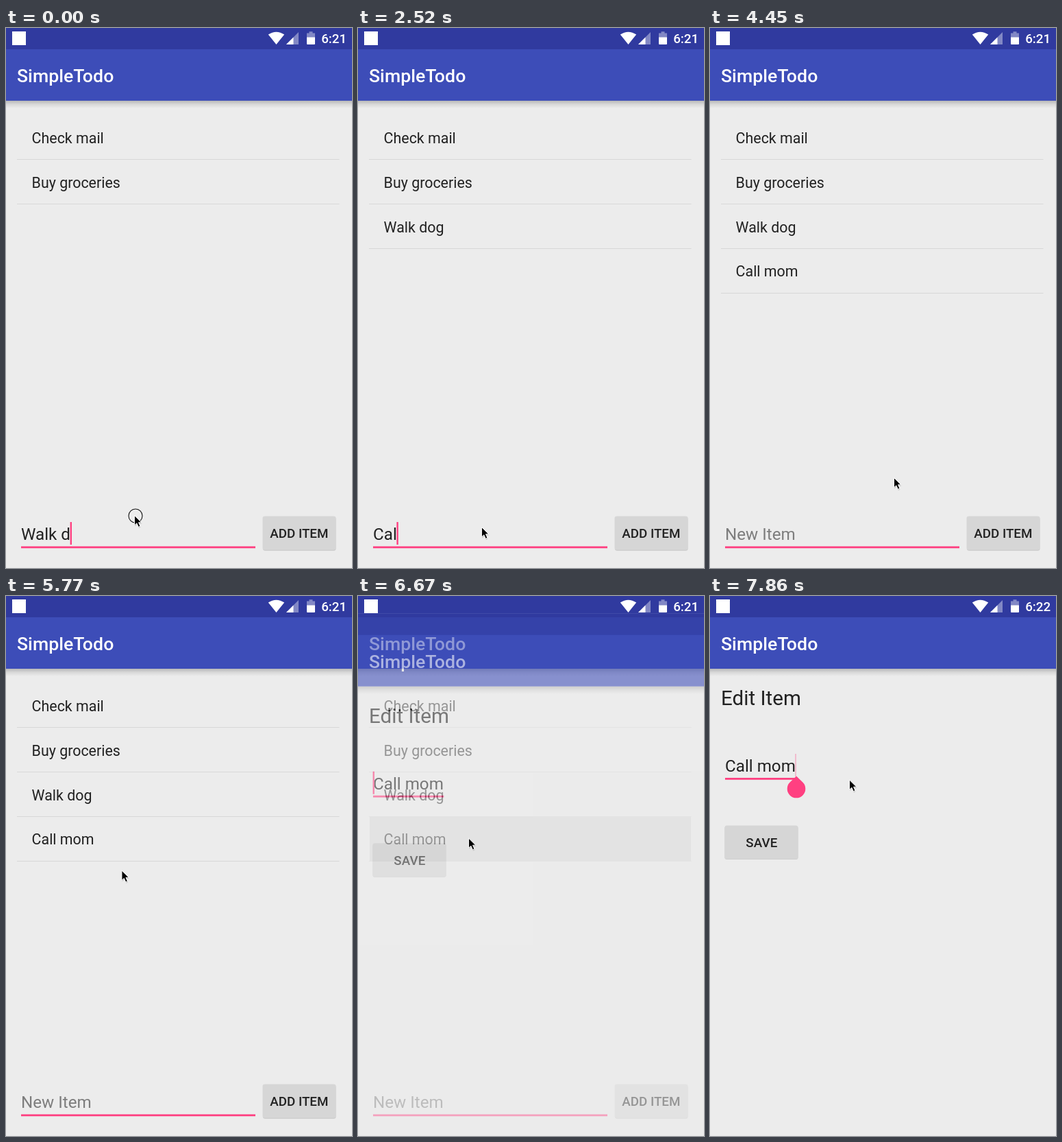
Animation of 505x787 px, one loop 8 s. Source, as an HTML page:

```html
<!DOCTYPE html>
<html lang="en">
<head>
<meta charset="utf-8">
<title>Todo list</title>
<style>
  html, body { margin: 0; width: 100%; height: 100%; overflow: hidden; background: #ececec; }
  svg { display: block; width: 505px; height: 787px; font-family: Roboto, "Noto Sans", sans-serif; fill: #212121; }
  .bold { font-weight: 500; font-size: 18.8px; }
  .title { font-weight: 500; font-size: 26.7px; fill: #fff; }
  .item { font-size: 21.4px; }
  .field { font-size: 24.2px; }
  .heading { font-size: 29.6px; }
  .mid { text-anchor: middle; }
  .pink { fill: #ff4081; }
  text { white-space: pre; }
</style>
</head>
<body>
<svg viewBox="0 0 505 787">
  <defs>
    <linearGradient id="shade" x2="0" y2="1">
      <stop offset="0" stop-color="#000" stop-opacity=".22"/>
      <stop offset=".5" stop-color="#000" stop-opacity=".08"/>
      <stop offset="1" stop-color="#000" stop-opacity="0"/>
    </linearGradient>
    <clipPath id="row"><rect x="17" y="322" width="469" height="64.5"/></clipPath>
    <g id="bar">
      <rect width="505" height="787" fill="#ececec"/>
      <rect y="106" width="505" height="11" fill="url(#shade)"/>
      <rect width="505" height="106" fill="#3d4db8"/>
      <rect width="505" height="31" fill="#303a9f"/>
      <text class="title" x="16" y="79">SimpleTodo</text>
    </g>
  </defs>

  <g id="list">
    <use href="#bar"/>
    <g id="press" clip-path="url(#row)">
      <rect x="17" y="322" width="469" height="65" fill="#e3e3e3"/>
      <circle id="ripple" cy="354" fill="#d8d8d8"/>
    </g>
    <g id="items"></g>
    <text id="typed" class="field" x="22" y="746"></text>
    <rect class="pink" x="22" y="755.4" width="342" height="2.8"/>
    <rect id="caret" class="pink" y="720" width="2.4" height="33"/>
    <rect x="375" y="713" width="106.5" height="48.8" rx="3" fill="#c8c8c8"/>
    <rect id="add" x="374.5" y="711.5" width="107" height="49.3" rx="3"/>
    <text class="bold mid" x="427.8" y="742.8">ADD ITEM</text>
  </g>

  <g id="edit">
    <use href="#bar"/>
    <text class="heading" x="16" y="159">Edit Item</text>
    <text class="field" x="22" y="256">Call mom</text>
    <rect class="pink" x="22" y="265" width="103.3" height="2.8"/>
    <rect id="editCaret" class="pink" y="230" height="33"/>
    <path id="handle" class="pink" d="M126 262.4 L135.4 271.6 A13.3 13.3 0 1 1 116.6 271.6 Z"/>
    <rect x="21.5" y="335.5" width="107" height="48.5" rx="3" fill="#c8c8c8"/>
    <rect x="21.5" y="334.5" width="107" height="49" rx="3" fill="#d6d6d6"/>
    <text class="bold mid" x="75.3" y="366">SAVE</text>
  </g>

  <g fill="#fff">
    <rect x="9" y="5" width="20" height="20"/>
    <path d="M394.5 24 L382.8 9.5 Q394.5 1.8 406.2 9.5 Z"/>
    <path d="M427 6 V24 H409 Z" opacity=".4"/>
    <path d="M419.5 13.5 V24 H409 Z"/>
    <path d="M439 7.5 H442.5 V5.3 H447.5 V7.5 H451 V14 H439 Z" opacity=".4"/>
    <path d="M439 13.5 H451 V23 Q451 24 450 24 H440 Q439 24 439 23 Z"/>
    <text id="clock" class="bold" x="460.2" y="22" fill="#fff"></text>
  </g>

  <g id="pointer">
    <circle id="ring" cx="2" cy="1" r="10" fill="none" stroke="#111" stroke-width="1.1"/>
    <g transform="scale(1.05)">
      <path d="M1 2 V15.5 L4.2 12.6 L6.6 18 L9 17 L6.7 11.8 H11 Z" fill="#000" opacity=".15"/>
      <path d="M.5 .5 V14 L3.7 11.2 L6 16.4 L8.5 15.3 L6.2 10.2 H10.3 Z" fill="#000" stroke="#fff" stroke-width=".9"/>
    </g>
  </g>
</svg>
<script>
const LOOP = 8000, TICK = 148.2, BLINK = 500;
const ROW_TAP = 6220, OPEN = 6600, TEXT_TAP = 7400, MINUTE = 7500;

const $ = id => document.getElementById(id);
const set = (id, attrs) => { for (const k in attrs) $(id).setAttribute(k, attrs[k]); };
const show = (id, on) => { $(id).style.display = on ? '' : 'none'; };
const progress = (t, from, to) => Math.min(1, Math.max(0, (t - from) / (to - from)));
const mix = (a, b, p) => a + (b - a) * p;
const smooth = p => p * p * (3 - 2 * p);

const home = [187, 710], button = [445, 738];
const moves = [
  { from: 250, to: 740, end: button },
  { from: 1330, to: 1770, end: [180, 727] },
  { from: 3260, to: 3850, end: button },
  { from: 4000, to: 4440, end: [268, 655] },
  { from: 4600, to: 5030, end: [176, 446] },
  { from: 5340, to: 5920, end: [161, 354] },
  { from: 6600, to: 6810, end: [161, 348] },
  { from: 6810, to: 7260, end: [116, 248] },
  { from: 7410, to: 7850, end: [203, 267.5] }
];
const entries = [
  { text: 'Walk dog', from: -1204, to: 240, press: 1030, sent: 1180 },
  { text: 'Call mom', from: 2220, to: 2900, press: 3850, sent: 3920 }
];
const labels = ['Check mail', 'Buy groceries', ...entries.map(e => e.text)];

$('items').innerHTML = labels.map((label, i) => `<g id="item${i}">
  <text class="item" x="37.6" y="${168 + i * 64.8}">${label}</text>
  <rect x="16" y="${191 + i * 65}" width="470.5" height="1" fill="#d8d8d8"/></g>`).join('');

const pointerAt = t => moves.reduce((pos, { from, to, end }) => {
  const p = smooth(progress(t, from, to));
  return pos.map((v, i) => mix(v, end[i], p));
}, home);

// Typing starts slowly and speeds up.
function typedAt(t) {
  const entry = entries.find(e => t >= e.from && t < e.sent);
  if (!entry) return '';
  const { text, from, to } = entry;
  return text.slice(0, Math.floor(1.3 + (text.length - 1.2) * progress(t, from, to) ** 1.5));
}

// The caret lights up at every input and blinks from there.
function caretOn(t) {
  const inputs = entries.flatMap(e => [t >= e.from ? Math.min(t, e.to) : -LOOP, e.sent]);
  const last = Math.max(...inputs.filter(time => time <= t));
  return (t - last) % (2 * BLINK) < BLINK;
}

function drawList(t) {
  entries.forEach((e, i) => show('item' + (i + 2), t >= e.sent));

  const text = typedAt(t), field = $('typed');
  field.textContent = text;
  set('caret', { x: 21.6 + (text ? field.getComputedTextLength() : 0) });
  show('caret', caretOn(t));
  field.textContent = text || 'New Item';
  field.style.fill = text ? '' : '#7d7d7d';

  const pressed = Math.max(...entries.map(e => Math.sin(Math.PI * progress(t, e.press, e.press + 590))));
  const grey = Math.round(mix(214, 200, pressed));
  set('add', { fill: `rgb(${grey},${grey},${grey})` });

  const spread = progress(t, ROW_TAP, ROW_TAP + 390);
  set('ripple', { cx: mix(161, 251, spread), r: 237 * spread });
  show('press', t >= ROW_TAP);
}

function drawEdit(t) {
  const entered = 1 - (1 - progress(t, OPEN, OPEN + 200)) ** 2;
  set('edit', { opacity: entered, transform: `translate(0 ${60 * (1 - entered)})` });
  show('edit', t >= OPEN);
  const tapped = t >= TEXT_TAP;
  set('editCaret', tapped ? { x: 124.5, width: 1, opacity: .55 } : { x: 21.6, width: 2.4, opacity: 1 });
  show('editCaret', tapped || t < OPEN + BLINK);
  show('handle', tapped);
}

function draw(t) {
  drawList(t);
  drawEdit(t);
  $('clock').textContent = t < MINUTE ? '6:21' : '6:22';
  set('pointer', { transform: `translate(${pointerAt(t)})` });
  show('ring', t < TICK || Math.abs(t - TEXT_TAP + TICK) < TICK / 2);
}

const start = performance.now();
function tick() {
  const t = (performance.now() - start) % LOOP;
  draw(Math.floor((t + 8) / TICK) * TICK);
  requestAnimationFrame(tick);
}
tick();
</script>
</body>
</html>
```
